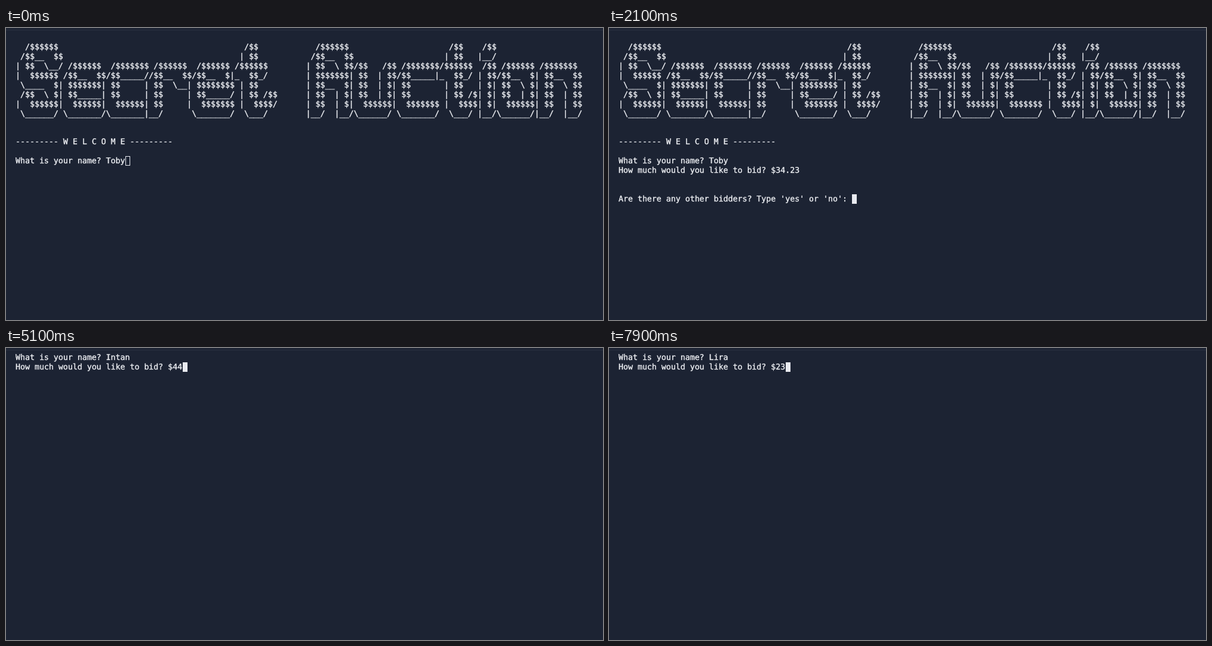
Recreate the animation shown at these times as an HTML page. Size 1000 by 490 pixels, loop 8000 ms.

```html
<!DOCTYPE html>
<html lang="en">
<head>
<meta charset="utf-8">
<title>Secret Auction</title>
<style>
  html, body { margin: 0; width: 100%; height: 100%; overflow: hidden; background: #1c2333; }
  body { position: relative; }
  #rule { position: absolute; top: 3px; left: 0; width: 100%; height: 1px; background: #2a3142; }
  #screen {
    position: absolute; left: 16px; top: 9px; margin: 0;
    font: 13.265px/15.94px "DejaVu Sans Mono", monospace;
    text-rendering: geometricPrecision; color: #eff1f5;
    -webkit-text-stroke: 0.35px #eff1f5;
  }
  #cursor { position: absolute; box-sizing: border-box; width: 8px; height: 16px; border: 1px solid #e9ebf1; }
</style>
</head>
<body>
<div id="rule"></div>
<pre id="screen"></pre>
<div id="cursor"></div>
<script>
const LOOP = 8000, LEFT = 16, TOP = 8, CELL = 7.986, LINE = 15.94;

// Banner letters, rows split by ";" and aligned at the bottom
const raw = String.raw;
const glyphs = {
  S: raw`  /$$$$$$; /$$__  $$;| $$  \__/;|  $$$$$$; \____  $$; /$$  \ $$;|  $$$$$$/; \______/`,
  A: raw`  /$$$$$$; /$$__  $$;| $$  \ $$;| $$$$$$$$;| $$__  $$;| $$  | $$;| $$  | $$;|__/  |__/`,
  e: raw`  /$$$$$$; /$$__  $$;| $$$$$$$$;| $$_____/;|  $$$$$$$; \_______/`,
  c: raw`  /$$$$$$$; /$$_____/;| $$;| $$;|  $$$$$$$; \_______/`,
  r: raw`  /$$$$$$; /$$__  $$;| $$  \__/;| $$;| $$;|__/`,
  t: raw`   /$$;  | $$; /$$$$$$;|_  $$_/;  | $$;  | $$ /$$;  |  $$$$/;   \___/`,
  u: raw` /$$   /$$;| $$  | $$;| $$  | $$;| $$  | $$;|  $$$$$$/; \______/`,
  i: raw` /$$;|__/; /$$;| $$;| $$;| $$;| $$;|__/`,
  o: raw`  /$$$$$$; /$$__  $$;| $$  \ $$;| $$  | $$;|  $$$$$$/; \______/`,
  n: raw` /$$$$$$$;| $$__  $$;| $$  \ $$;| $$  | $$;| $$  | $$;|__/  |__/`,
  " ": ""
};
const advance = { i: 3, " ": 7 };

// Each letter overlaps the last column of the one before it
function banner(word) {
  const grid = Array.from({ length: 8 }, () => Array(120).fill(" "));
  let x = 0;
  for (const letter of word) {
    const rows = glyphs[letter].split(";");
    rows.forEach((row, y) => [...row].forEach((ch, i) => {
      if (ch !== " ") grid[8 - rows.length + y][x + i] = ch;
    }));
    x += advance[letter] || 9;
  }
  return grid.map(row => row.join("").trimEnd()).join("\n");
}

const askName = "What is your name? ";
const askBid = "\nHow much would you like to bid? $";
const askMore = "\n\n\nAre there any other bidders? Type 'yes' or 'no': ";
const CLEAR = "\f";

// Terminal output: [time in ms, appended text]
const output = [
  [0, "\n" + banner("Secret Auction") + "\n\n\n--------- W E L C O M E ---------\n\n" + askName + "Toby"],
  [1000, askBid], [1500, "3"], [1600, "4"], [1800, "."], [1900, "2"], [2000, "3"],
  [2100, askMore], [3100, "y"], [3200, "e"], [3400, "s"],
  [3500, CLEAR + askName], [3800, "I"], [4000, "n"], [4200, "ta"], [4300, "n"],
  [4400, askBid], [4900, "4"], [5100, "4"], [5200, "."], [5300, "4"], [5400, "5"],
  [5600, askMore], [6400, "ye"], [6600, "s"],
  [6700, CLEAR + askName], [7000, "L"], [7200, "i"], [7300, "r"], [7400, "a"],
  [7500, askBid], [7800, "2"], [7900, "3"]
];

const screenEl = document.getElementById("screen");
const cursorEl = document.getElementById("cursor");

function draw(t) {
  const text = output.filter(([at]) => at <= t).map(([, s]) => s).join("").split(CLEAR).pop();
  if (screenEl.textContent !== text) screenEl.textContent = text;
  const lines = text.split("\n");
  cursorEl.style.left = LEFT + lines[lines.length - 1].length * CELL + "px";
  cursorEl.style.top = TOP + (lines.length - 1) * LINE + "px";
  // Hollow until the terminal gains focus
  cursorEl.style.background = t < 200 ? "none" : "#e9ebf1";
}

const start = performance.now();
function tick() {
  draw((performance.now() - start) % LOOP);
  requestAnimationFrame(tick);
}
tick();
</script>
</body>
</html>
```
